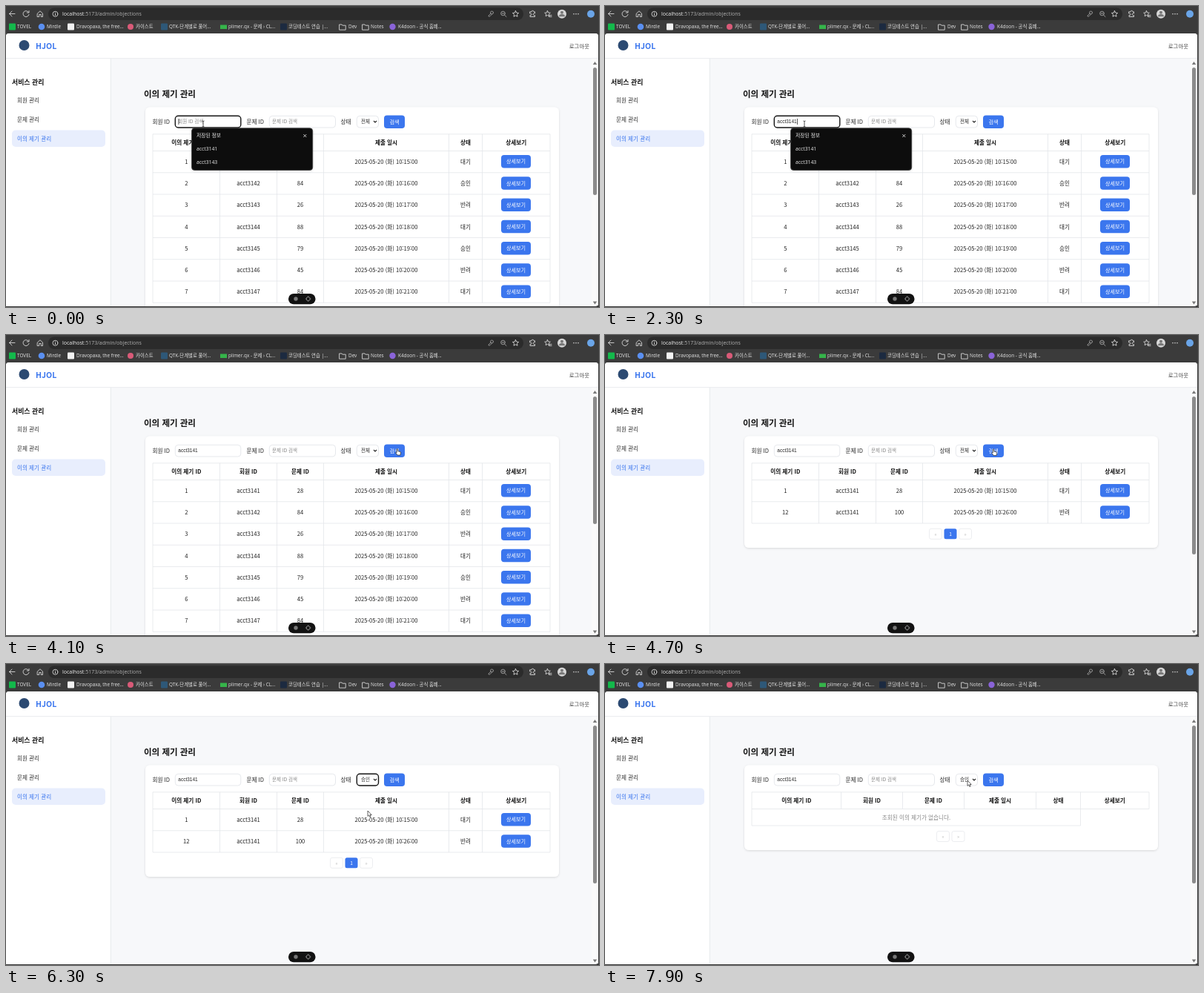
An HTML page for the animation above (8000 ms loop, 800 px wide and 406 px high).

```html
<!DOCTYPE html>
<html lang="ko">
<head>
<meta charset="utf-8">
<style>
html, body { margin: 0; width: 100%; height: 100%; overflow: hidden; background: #3b3b3b; }
svg { display: block; width: 800px; height: 406px; }
text { font: 7.6px "Noto Sans CJK KR", "Noto Sans KR", "Noto Sans CJK", sans-serif; fill: #222; white-space: pre; }
.ui { font-family: "Open Sans", "Noto Sans CJK KR", sans-serif; }
.field { font-family: "Liberation Sans", "Noto Sans CJK KR", sans-serif; }
.icon { fill: none; stroke: #d6d6d6; stroke-width: .9; stroke-linecap: round; stroke-linejoin: round; }
</style>
</head>
<body>
<svg viewBox="0 0 800 406">
  <defs>
    <filter id="soft" x="-20%" y="-20%" width="140%" height="150%">
      <feDropShadow dx="0" dy="1" stdDeviation="1.5" flood-opacity=".13"/>
    </filter>
    <filter id="deep" x="-30%" y="-30%" width="160%" height="170%">
      <feDropShadow dx="0" dy="2" stdDeviation="2.5" flood-opacity=".4"/>
    </filter>
  </defs>
  <g id="frame"></g>
  <g id="page"></g>
  <g id="overlay"></g>
  <g id="cursor"></g>
</svg>
<script>
const LOOP = 8000, BLUE = '#3b76ee', LINE = '#e4e6ea';
const $ = id => document.getElementById(id);

const text = (x, y, s, { size = 7.6, fill = '#222', weight = 400, anchor = 'start', cls = '' } = {}) =>
  `<text x="${x}" y="${y}" class="${cls}" text-anchor="${anchor}" style="font-size:${size}px;font-weight:${weight};fill:${fill}">${s}</text>`;
const mid = (x, y, s, o = {}) => text(x, y, s, { anchor: 'middle', ...o });
const rect = (x, y, x2, y2, fill, r = 0, more = '') =>
  `<rect x="${x}" y="${y}" width="${x2 - x}" height="${y2 - y}" rx="${r}" fill="${fill}" ${more}/>`;
const dot = (x, y, r, fill) => `<circle cx="${x}" cy="${y}" r="${r}" fill="${fill}"/>`;
const icon = (d, more = '') => `<path class="icon" d="${d}" ${more}/>`;
const line = (x, y, x2, y2) => `<path d="M${x} ${y}L${x2} ${y2}" stroke="${LINE}" stroke-width=".8"/>`;
const star = (x, y, r) => 'M' + Array.from({ length: 10 }, (_, i) => {
  const a = i * Math.PI / 5 - Math.PI / 2, d = i % 2 ? r * .48 : r;
  return `${(x + d * Math.cos(a)).toFixed(2)} ${(y + d * Math.sin(a)).toFixed(2)}`;
}).join('L') + 'Z';

// Browser chrome, page header and sidebar
function frame() {
  const ui = { size: 6.4, fill: '#e6e6e6', cls: 'ui' };
  const square = (x, fill) => rect(x, 23.5, x + 9, 32.5, fill, 1);
  const folder = x => icon(`M${x} 25h3l1 1.2h4.2v6h-8.2z`);
  const marks = [
    [15, 'TOVEL'], [55, 'Mirdle'], [95, 'Dravopaxa, the free...'], [175, '카이스트'],
    [220, 'QTK-단계별로 풀어...'], [300, 'plimer.qx - 문제 › CL...'], [381, '코딩테스트 연습 |...'],
    [462, 'Dev'], [492, 'Notes'], [529, 'K4doon - 공식 홈페...']
  ];
  return rect(0, 0, 800, 406, '#3b3b3b') + rect(57, 2.5, 698, 19, '#2b2b2b', 8)
    + icon('M12 10.5H4.5M8 7L4.5 10.5L8 14')
    + icon('M30.5 8.5A4 4 0 1 0 31 11.5M31 6.5V9H28.3')
    + icon('M42.5 10L46 6.8L49.5 10V14.5H47.3V11.5H44.7V14.5H42.5Z')
    + icon('M70 10.8a3.5 3.5 0 1 0-7 0a3.5 3.5 0 1 0 7 0M66.5 10.3V12.6M66.5 8.8V8.9')
    + text(76, 13.2, 'localhost<tspan fill="#b0b0b0">:5173/admin/objections</tspan>', { size: 7, fill: '#f2f2f2', cls: 'ui' })
    + icon('M654 10L651 13V14H652.5L655.5 11.3M657.5 9a2 2 0 1 0-4 0a2 2 0 1 0 4 0', 'style="stroke:#999"')
    + icon('M673.3 10a2.8 2.8 0 1 0-5.6 0a2.8 2.8 0 1 0 5.6 0M672.6 12.2L675 14.5M669.3 10H671.7', 'style="stroke:#aaa"')
    + icon(star(687.5, 10.8, 4.3))
    + icon('M707 7.8H709a1.5 1.5 0 1 1 3 0H713.5V10a1.5 1.5 0 1 0 0 2.5V14.5H707V12.5a1.4 1.4 0 1 0 0-2.6Z')
    + icon(star(730.5, 10.5, 4)) + icon('M733 12.5H736M732.5 14.5H736')
    + dot(750, 10.8, 6, '#d8d8d8') + dot(750, 8.8, 2, '#777') + '<path d="M746 14.3a4 3.2 0 0 1 8 0z" fill="#777"/>'
    + [766, 769, 772].map(x => dot(x, 10.8, .8, '#ddd')).join('')
    + dot(789, 10.8, 5, '#6aa5e8')
    + square(4, '#13b94b') + dot(48, 28, 4.3, '#5a8ff0') + square(83, '#f2f2f2') + dot(168, 28, 4, '#d95a78')
    + square(209, '#2e5878') + rect(289, 25.5, 298, 31, '#35b44a') + square(370, '#1c2a40')
    + folder(450) + folder(481) + dot(521.5, 28, 4.2, '#8a63d8')
    + marks.map(([x, s]) => text(x, 30.4, s, ui)).join('')
    + rect(0, 37, 799, 405, '#f7f8fa', 4) + rect(0, 37, 799, 70.5, '#fff', 4)
    + rect(0, 66, 799, 70.5, '#fff') + rect(0, 71, 141, 405, '#fff')
    + line(0, 70.7, 799, 70.7) + line(141.3, 71, 141.3, 405)
    + dot(24.5, 53, 7, '#2c4a72')
    + text(40, 57.6, 'HJOL', { size: 10.6, fill: BLUE, weight: 700 })
    + text(787, 56.6, '로그아웃', { anchor: 'end', size: 7.4, fill: '#444' })
    + text(8, 105.6, '서비스 관리', { size: 8.9, weight: 700, fill: '#111' })
    + rect(8, 167.5, 134, 190, '#e8eefd', 5)
    + text(15, 129.8, '회원 관리', { fill: '#333' }) + text(15, 155.8, '문제 관리', { fill: '#333' })
    + text(15, 181.6, '이의 제기 관리', { fill: BLUE, weight: 500 })
    + rect(790, 71, 799, 404, '#fafafa')
    + '<path d="M791.8 79L794.5 75L797.2 79ZM791.8 398.5L794.5 402.5L797.2 398.5Z" fill="#777"/>'
    + text(186, 123.2, '이의 제기 관리', { size: 11.5, weight: 700, fill: '#111' });
}

const wide = [198, 288.5, 365.5, 428.5, 597.5, 642.5, 734];
const bare = [198, 318.5, 401.5, 484.5, 581.5, 641.5, 734];
const heads = ['이의 제기 ID', '회원 ID', '문제 ID', '제출 일시', '상태', '상세보기'];
const states = ['대기', '승인', '반려'];
const account = i => 'acct' + (3141 + i);
const entry = (i, n) => [i + 1, account(i % 11), n, `2025-05-20 (화) 10:${15 + i}:00`, states[i % 3]];
const all = [28, 84, 26, 88, 79, 45, 84].map((n, i) => entry(i, n));
const found = [all[0], entry(11, 100)];
const rowTop = i => 195.5 + i * 29.25;

function table(rows) {
  const cols = rows.length ? wide : bare;
  const center = c => (cols[c] + cols[c + 1]) / 2;
  const bottom = rows.length ? rowTop(rows.length) : 218;
  let out = line(198, 172.8, 734, 172.8) + line(198, 195.5, 734, 195.5);
  cols.forEach((x, c) => {
    const end = rows.length || c === 0 || c === 5 ? bottom : 195.5;
    out += line(x, 172.8, x, end);
  });
  heads.forEach((s, c) => out += mid(center(c), 187.2, s, { weight: 700, fill: '#111' }));
  rows.forEach((row, i) => {
    const y = rowTop(i);
    row.forEach((s, c) => out += mid(center(c), y + 17.4, s));
    out += rect(668, y + 5.5, 708, y + 23, BLUE, 4)
      + mid(688, y + 16.9, '상세보기', { size: 7.1, fill: '#fff', weight: 500 })
      + line(198, y + 29.25, 734, y + 29.25);
  });
  if (!rows.length) out += line(198, 218, 641.5, 218)
    + mid(420, 209.6, '조회된 이의 제기가 없습니다.', { fill: '#888' });
  return out;
}

function pager(count) {
  const box = (x, y, s) => rect(x, y, x + 17, y + 14, '#fff', 2.5, `stroke="${LINE}" stroke-width=".7"`)
    + mid(x + 8.5, y + 9.2, s, { size: 6.5, fill: '#bbb' });
  return count
    ? box(437.5, 261.3, '«') + rect(457.5, 261.3, 474.5, 275.3, BLUE, 2.5)
      + mid(466, 270.9, '1', { size: 6.6, fill: '#fff' }) + box(477.5, 261.3, '»')
    : box(447.5, 225.5, '«') + box(468, 225.5, '»');
}

const pen = document.createElement('canvas').getContext('2d');
function typedWidth(s) {
  pen.font = '65px "Liberation Sans", sans-serif';
  return pen.measureText(s).width / 10;
}

const keyTimes = [1100, 1300, 1500, 1700, 1900, 2000, 2100, 2200];

function page(t) {
  const rows = t < 4300 ? all : t < 7300 ? found : [];
  const focusInput = t < 3900, focusSelect = t >= 6200 && t < 7200;
  const typed = account(0).slice(0, keyTimes.filter(k => t >= k).length);
  const caret = focusInput && (t < 2500 ? t < 500 || t > 1000 : t > 3100 && t < 3600);
  const field = (x, x2, focus) => rect(x, 148.3, x2, 164, '#fff', 4,
    `stroke="${focus ? '#151515' : '#dcdfe4'}" stroke-width="${focus ? 1.4 : .7}"`);
  const fieldText = (x, s, fill = '#222') => text(x, 158.4, s, { size: 6.5, fill, cls: 'field' });
  const bottom = rows === all ? 420 : rows.length ? 287 : 251;
  const cx = 233 + typedWidth(typed);
  return rect(188, 136.5, 746, bottom, '#fff', 6, 'filter="url(#soft)"')
    + text(197.5, 159.2, '회원 ID') + text(324.5, 159.2, '문제 ID') + text(451.5, 159.2, '상태')
    + field(228.3, 316.8, focusInput) + field(355.3, 444.5) + field(473.3, 502.5, focusSelect)
    + (typed ? fieldText(232.3, typed) : fieldText(232.3, '회원 ID 검색', '#888'))
    + (caret ? rect(cx - .4, 152, cx + .3, 160, '#111') : '')
    + fieldText(359, '문제 ID 검색', '#888')
    + fieldText(479, t < 6200 ? '전체' : '승인')
    + '<path d="M496 155L498 157L500 155" fill="none" stroke="#222" stroke-width="1.1"/>'
    + rect(510, 147.6, 538, 165, BLUE, 4) + mid(524, 158.8, '검색', { size: 7.2, fill: '#fff', weight: 500 })
    + table(rows) + (rows === all ? '' : pager(rows.length))
    + rect(0, 405, 800, 406, '#3b3b3b')
    + rect(792, 83, 797, rows === all ? 255 : 296, '#8b8b8b', 2.5);
}

function overlay(t, y) {
  let out = rect(381, 388, 417.5, 402.3, '#121212', 7.1) + dot(391, 395, 2.7, '#777')
    + '<circle cx="407.7" cy="395" r="2.6" fill="none" stroke="#999" stroke-width=".8"/>'
    + '<path d="M407.7 391.2v2M407.7 396.8v2M403.9 395h2M409.5 395h2" stroke="#999" stroke-width=".7"/>';
  if (t < 2700) {
    const light = { size: 6.8, fill: '#eee', cls: 'ui' };
    out += rect(250.5, 164.7, 413.7, 221.5, '#111', 4, 'stroke="#3a3a3a" stroke-width=".7" filter="url(#soft)"')
      + text(257, 177.2, '저장된 정보', light)
      + '<path d="M401.3 173L405.3 177M405.3 173L401.3 177" stroke="#eee" stroke-width=".8"/>'
      + text(257, 194.7, account(0), light) + text(257, 212.7, account(2), light);
  }
  if (t >= 5400 && t < 6200) {
    const pick = Math.max(0, Math.min(3, Math.floor((y - 167) / 13)));
    out += rect(473.5, 167, 502, 219, '#fff', 2, 'stroke="#999" stroke-width=".5" filter="url(#deep)"')
      + rect(473.5, 167 + pick * 13, 502, 180 + pick * 13, '#767676', pick ? 0 : 2)
      + ['전체', ...states].map((s, i) => text(479, 175.8 + i * 13, s,
        { size: 6.5, fill: i === pick ? '#fff' : '#222', cls: 'field' })).join('');
  }
  return out;
}

// Pointer hot spot: time, x, y
const path = [
  [0, 266, 159], [1900, 266, 159], [2300, 269, 159], [2600, 269, 159], [2900, 452.5, 164],
  [3300, 525, 156], [3800, 528, 153], [4600, 528, 153], [5100, 491, 157], [5400, 491, 157],
  [5700, 491, 169], [6050, 488, 198], [6300, 488, 198], [6700, 524, 155], [7400, 524, 155],
  [7800, 489, 157], [8000, 489, 157]
];
function pointer(t) {
  const i = path.findIndex(p => p[0] > t), [t0, x0, y0] = path[i - 1], [t1, x1, y1] = path[i];
  const u = (t - t0) / (t1 - t0), e = u * u * (3 - 2 * u);
  return [x0 + (x1 - x0) * e, y0 + (y1 - y0) * e];
}

const shapes = {
  beam: '<path d="M-1.5-4Q0-4 0-3V3Q0 4-1.5 4M1.5-4Q0-4 0-3M0 3Q0 4 1.5 4" fill="none" stroke="#222" stroke-width=".8"/>',
  arrow: '<path d="M0 0V7.4L1.7 5.9L2.9 8.5L4.1 8L3 5.5H5.2Z" fill="#fff" stroke="#222" stroke-width=".7"/>',
  hand: '<path d="M-.8 1Q0-.3.8 1V3.7L4 4.5Q4.8 4.8 4.6 6L4 9H0L-2.4 5.8Q-2.2 4.7-.8 5.5Z" fill="#fff" stroke="#222" stroke-width=".7"/>'
};
function shapeAt(x, y) {
  if (y < 147.5 || y > 165) return 'arrow';
  if (x > 510 && x < 538) return 'hand';
  return (x > 228 && x < 317) || (x > 355 && x < 445) ? 'beam' : 'arrow';
}

const drawn = {};
function put(id, html) {
  if (drawn[id] !== html) $(id).innerHTML = drawn[id] = html;
}

function draw() {
  const t = Math.floor(performance.now() % LOOP / 100) * 100;
  const [x, y] = pointer(t);
  put('page', page(t));
  put('overlay', overlay(t, y));
  put('cursor', `<g transform="translate(${x} ${y})">${shapes[shapeAt(x, y)]}</g>`);
  requestAnimationFrame(draw);
}
put('frame', frame());
draw();
</script>
</body>
</html>
```
